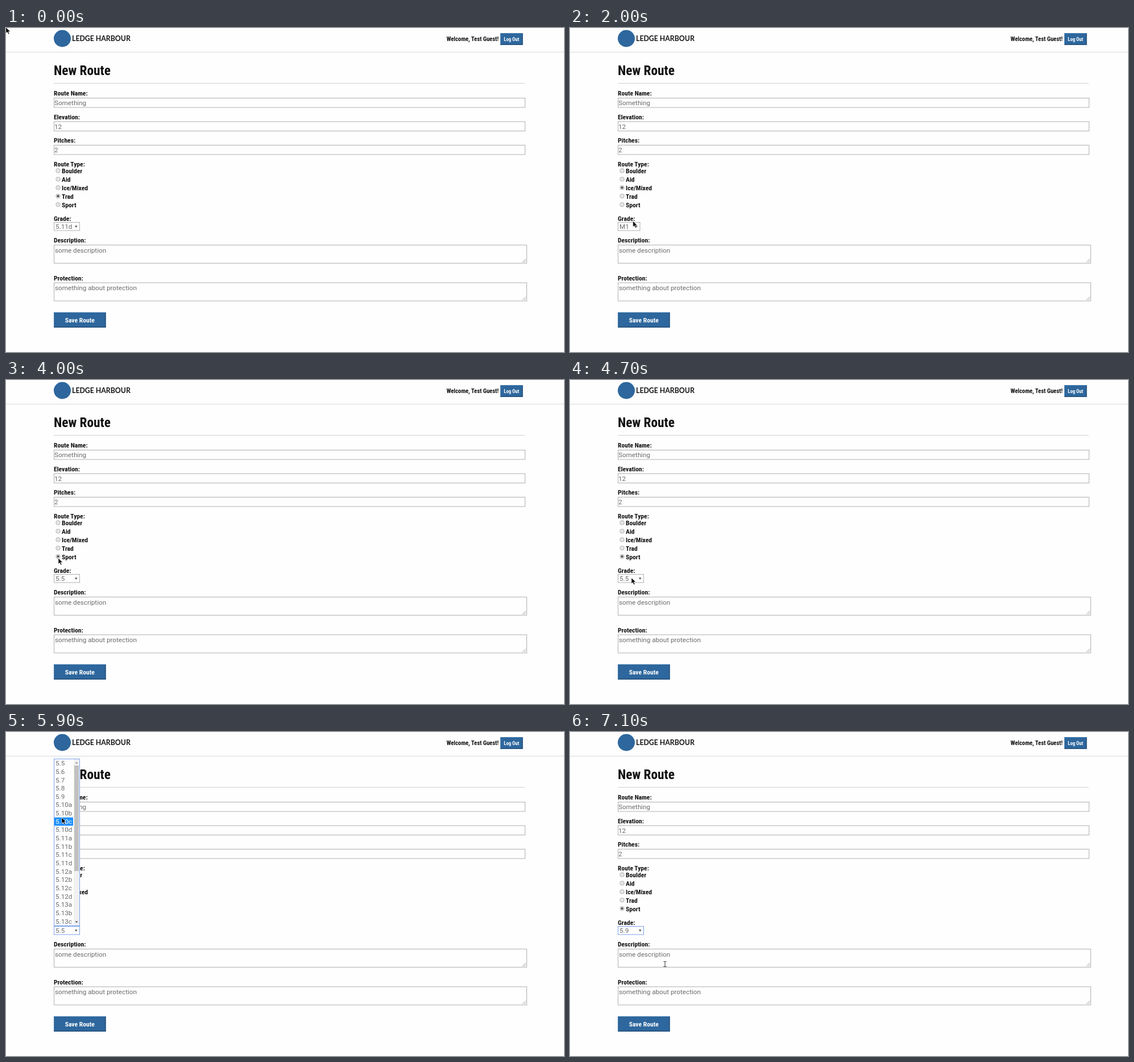
Animation, 981 px wide and 571 px high, one loop 7200 ms. Source, as an HTML page:

```html
<!DOCTYPE html>
<html lang="en">
<head>
<meta charset="utf-8">
<title>New Route</title>
<style>
  html, body { margin: 0; width: 100%; height: 100%; overflow: hidden; background: #fefefe; }
  svg { display: block; }
  text { white-space: pre; }
  .label { font: 700 11.6px "Roboto Condensed", Roboto, sans-serif; font-stretch: 75%; fill: #111; }
  .value { font: 400 11.7px Roboto, sans-serif; fill: #6b6b6b; }
  .brand { font: 700 12.3px Lato, sans-serif; fill: #161616; }
  .box { fill: #fefefe; stroke: #b0b0b0; }
  .focus { stroke: #7da2e8; }
</style>
</head>
<body>
<svg id="stage" width="981" height="571" viewBox="0 0 981 571"></svg>
<script>
const LOOP = 7200, STEP = 100, ROW = 14.65;
const stage = document.getElementById('stage');

const types = ['Boulder', 'Aid', 'Ice/Mixed', 'Trad', 'Sport'];
const iceGrades = Array.from({ length: 16 }, (_, i) => 'M' + (i + 1));
const rockGrades = [5, 6, 7, 8, 9].map(n => '5.' + n);
for (let n = 10; n < 14; n++) for (const letter of 'abcd') rockGrades.push(`5.${n}${letter}`);

const iceList = { options: iceGrades, top: 357.5, bottom: 580, width: 38.5 };
const rockList = { options: rockGrades.slice(0, 20), top: 47.5, bottom: 341.5, width: 45, scrollbar: true };

// Form state from each moment on: checked type, grade, select width, focus, open list
const states = [
  { at: 0, type: 3, grade: '5.11d', width: 45 },
  { at: 1100, type: 2, grade: 'M1', width: 38.5 },
  { at: 2400, type: 2, grade: 'M1', width: 38.5, focus: true, list: iceList },
  { at: 3700, type: 2, grade: 'M5', width: 38.5, focus: true },
  { at: 3900, type: 4, grade: '5.5', width: 45 },
  { at: 4800, type: 4, grade: '5.5', width: 45, focus: true, list: rockList },
  { at: 6500, type: 4, grade: '5.9', width: 45, focus: true }
];

// Pointer path: time, x, y
const path = [
  [0, 0, -1], [500, 51, 115], [800, 90, 262], [900, 93, 274], [1100, 92, 279],
  [1200, 92, 279], [2100, 113, 348], [2500, 113, 350], [2900, 104, 388],
  [3300, 104, 562], [3600, 101, 424], [3700, 100, 418], [3900, 92, 314],
  [4200, 92, 314], [4500, 108, 348], [4800, 108, 349], [5200, 102, 298],
  [5900, 98, 151], [6300, 98, 110], [6400, 98, 110], [7000, 167, 409], [7200, 167, 409]
];

const rect = (x, y, w, h, attrs) => `<rect x="${x}" y="${y}" width="${w}" height="${h}" ${attrs}/>`;
const text = (x, y, cls, content, attrs = '') => `<text x="${x}" y="${y}" class="${cls}" ${attrs}>${content}</text>`;
const shape = (d, attrs) => `<path d="${d}" ${attrs}/>`;

function button(x, y, w, h, label, size) {
  return rect(x, y, w, h, 'fill="#2e679d"') +
    shape(`M${x} ${y + h - .75}h${w - .75}v${.75 - h}`, 'fill="none" stroke="#24507b" stroke-width="1.5"') +
    shape(`M${x + .5} ${y + h - 1}v${1.5 - h}h${w - 1}`, 'fill="none" stroke="#4379aa"') +
    text(x + w / 2, y + h / 2 + size * .36, 'label', label,
      `text-anchor="middle" style="fill:#fff;font-size:${size}px"`);
}

const field = (y, label, value) => text(84, y, 'label', label) +
  rect(84.5, y + 4.5, 828, 16.5, 'class="box"') + text(85, y + 17, 'value', value);

const area = (y, label, value) => text(84, y, 'label', label) +
  rect(84.5, y + 4.5, 831, 32, 'class="box"') + text(86, y + 17.5, 'value', value) +
  shape(`M908 ${y + 35}l6-6m-3 6l3-3`, 'stroke="#888" stroke-width=".8"');

const page =
  rect(0, 0, 981, 571, 'fill="#fefefe"') +
  '<circle cx="99" cy="18.5" r="15" fill="#2e679d"/>' +
  text(116, 23, 'brand', 'LEDGE HARBOUR') +
  text(866, 22.5, 'label', 'Welcome, Test Guest!', 'text-anchor="end" style="font-size:10.6px"') +
  button(869, 9, 39.5, 21, 'Log Out', 8.6) +
  rect(0, 42, 981, 1, 'fill="#d9d9d9"') +
  text(84, 83.3, 'label', 'New Route', 'style="font-size:23.3px"') +
  rect(84, 97, 828, 1, 'fill="#d0d0d0"') +
  field(119, 'Route Name:', 'Something') +
  field(160.5, 'Elevation:', '12') +
  field(202, 'Pitches:', '2') +
  text(84, 243.5, 'label', 'Route Type:') +
  types.map((name, i) => text(98, 256 + i * 14.9, 'label', name)).join('') +
  text(84, 340, 'label', 'Grade:') +
  area(378, 'Description:', 'some description') +
  area(444.5, 'Protection:', 'something about protection') +
  button(84, 501, 91.5, 27, 'Save Route', 11.6);

function radio(checked, i) {
  const at = `cx="91.5" cy="${251.5 + i * 14.9}"`;
  return `<circle ${at} r="3.7" fill="#e6e6e6" stroke="#aaa" stroke-width=".9"/>` +
    (checked ? `<circle ${at} r="2" fill="#4a4a4a"/>` : '');
}

function select({ grade, width, focus }) {
  const right = 84.5 + width;
  return rect(84.5, 342.5, width, 14.5, `class="box ${focus ? 'focus' : ''}"`) +
    text(87, 354, 'value', grade) +
    shape(`M${right - 8.5} 348.3h4.4l-2.2 3.6z`, 'fill="#555"');
}

function popup({ options, top, bottom, width, scrollbar }, pointerY) {
  const row = Math.floor((pointerY - top) / ROW);
  const active = row >= 0 && row < options.length ? row : 0;
  const inner = scrollbar ? 33 : width - 1;
  let out = rect(84.5, top, width, bottom - top, 'class="box focus"');
  options.forEach((option, i) => {
    const y = top + .5 + i * ROW;
    if (i === active) out += rect(85, y, inner, ROW, 'fill="#1e90ff"');
    out += text(87, y + 11.2, 'value', option, i === active ? 'style="fill:#fff"' : '');
  });
  if (scrollbar) {
    out += rect(119, top + .5, 10, bottom - top - 1, 'fill="#f1f1f1"') +
      rect(120, 59, 8, 186, 'fill="#c1c1c1"') +
      shape('M121.5 55.5h5l-2.5-3z', 'fill="#999"') +
      shape('M121.5 333.5h5l-2.5 3z', 'fill="#555"');
  }
  return out;
}

function pointer(x, y) {
  const overArea = x > 84 && x < 915 && y > 382 && y < 414;
  return `<g transform="translate(${x} ${y})">` + (overArea
    ? shape('M-2.5-4.5h2l.5.5.5-.5h2M0-4v8M-2.5 4.5h2l.5-.5.5.5h2', 'fill="none" stroke="#333"')
    : shape('M0 0v10.2l2.4-2.2 1.8 4 1.8-.8-1.8-3.9h3.3z', 'fill="#000" stroke="#fff" stroke-width=".6"')) + '</g>';
}

function pointerAt(t) {
  const i = path.findIndex(key => key[0] > t);
  const [t0, x0, y0] = path[i - 1], [t1, x1, y1] = path[i];
  const p = (t - t0) / (t1 - t0);
  return [x0 + (x1 - x0) * p, y0 + (y1 - y0) * p];
}

stage.innerHTML = page + '<g id="live"></g>';
const live = document.getElementById('live');
let shown = -1;

function render(t) {
  if (t === shown) return;
  shown = t;
  const state = states.filter(s => s.at <= t).pop();
  const [x, y] = pointerAt(t);
  // An open list covers the page, so it hides the pointer's text shape too
  const cursor = state.list ? pointer(x, y).replace(/<path.*\/>/, arrow) : pointer(x, y);
  live.innerHTML = types.map((_, i) => radio(i === state.type, i)).join('') +
    select(state) + (state.list ? popup(state.list, y) : '') + cursor;
}

const arrow = shape('M0 0v10.2l2.4-2.2 1.8 4 1.8-.8-1.8-3.9h3.3z', 'fill="#000" stroke="#fff" stroke-width=".6"');
const start = performance.now();
function frame() {
  const elapsed = (performance.now() - start) % LOOP;
  render(Math.floor(elapsed / STEP) * STEP);
  requestAnimationFrame(frame);
}
frame();
</script>
</body>
</html>
```
